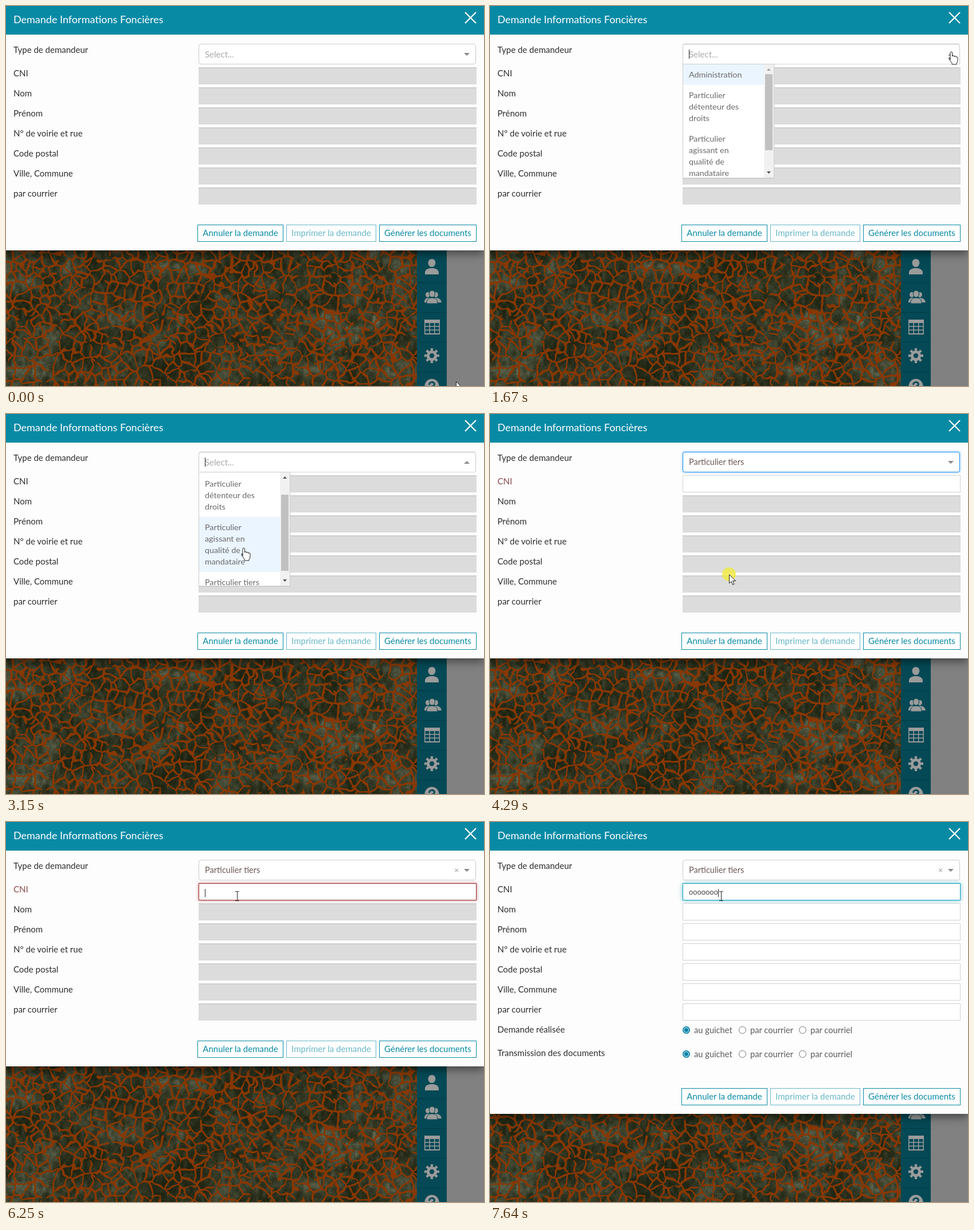
Recreate the animation shown at these times as an HTML page with a canvas. Size 834x664 px, loop 8000 ms.

```html
<!DOCTYPE html>
<html lang="fr">
<head>
<meta charset="utf-8">
<title>Demande Informations Foncières</title>
<style>
  html, body { margin: 0; width: 834px; height: 664px; overflow: hidden; background: #818181; }
  body { position: relative; font: 15px/20px Lato, sans-serif; color: #2e2e2e; }
  body * { box-sizing: border-box; }
  #form > *, #menu, #map, #side, #cursor, #click { position: absolute; }
  #map { left: 0; top: 427px; }
  #side { left: 717px; top: 427px; }
  #form { position: absolute; left: 0; top: 0; width: 834px; height: 427px; background: #fdfdfd; box-shadow: 0 5px 15px rgba(0,0,0,.5); }
  #form.long { height: 510px; }
  header { left: 0; top: 0; width: 834px; height: 50px; padding: 13px; background: #088aa5; color: #fff; font-size: 18px; }
  header svg { position: absolute; left: 800px; top: 10px; }
  .label { left: 13px; }
  .label.bad { color: #8d4a4a; }
  .field { left: 336px; width: 485px; height: 30px; padding-left: 10px; background: #dcdcdc; border: solid #cecece; border-width: 2px 0 0; font-size: 12.8px; line-height: 28px; white-space: nowrap; color: #444; }
  .field.on { background: #fff; border: 1px solid #d2d2d2; }
  .field.bad { border-color: #9c2a2e; box-shadow: 0 0 5px rgba(169,50,50,.65); }
  .field.good { border-color: #12a0bb; box-shadow: 0 0 7px rgba(18,160,187,.65); }
  .caret { display: inline-block; width: 1px; height: 14px; background: #222; vertical-align: middle; }
  #select { left: 336px; top: 66px; width: 484px; height: 36px; padding: 7px 10px; background: #fff; border: 1px solid #ccc; border-radius: 4px; color: #aaa; }
  #select.open { border-color: #b3b3b3 #ccc #d9d9d9; border-radius: 4px 4px 0 0; }
  #select.chosen { color: #705858; font-size: 14.5px; }
  #select.focus { border-color: #0a84f0; box-shadow: 0 0 0 3px rgba(0,126,255,.1); }
  #select .caret { position: absolute; left: 10px; top: 9px; height: 16px; }
  #select svg { position: absolute; left: 462px; top: 15px; }
  #select.open svg { transform: rotate(180deg); }
  #clear { position: absolute; left: 445px; top: 7px; color: #999; font-size: 14px; }
  #menu { left: 336px; top: 101px; width: 160px; height: 200px; background: #fff; border: 1px solid #ccc; overflow: hidden; box-shadow: 0 1px 0 rgba(0,0,0,.06); font-size: 14.3px; color: #6a6a6a; }
  #menu div { width: 141px; padding: 8px 10px; white-space: nowrap; }
  #menu div.hot { background: #ebf5ff; }
  #menu svg { position: absolute; left: 141px; top: 0; }
  .button { top: 382px; height: 30px; border: 1px solid #088aa5; background: #fff; color: #088aa5; line-height: 27px; text-align: center; white-space: nowrap; }
  .long .button { top: 465px; }
  .button.off { opacity: .6; }
  .button.hot { background: #088aa5; color: #fff; }
  .extra { visibility: hidden; }
  .long .extra { visibility: visible; }
  .radio { color: #5b5b5b; font-size: 14.7px; white-space: nowrap; }
  .radio::before { content: ""; position: absolute; left: -20px; top: 4px; width: 13px; height: 13px; box-sizing: border-box; border: 1px solid #767676; border-radius: 50%; background: #fff; }
  .radio.on::before { border: 2px solid #0a84a8; background: radial-gradient(#0a84a8 3.4px, #fff 4px); }
  #click { width: 24px; height: 24px; margin: -12px; border-radius: 50%; background: rgba(240,234,70,.85); }
  #cursor { left: 0; top: 0; overflow: visible; }
</style>
</head>
<body>
<canvas id="map" width="717" height="237"></canvas>

<svg id="side" width="52" height="237" viewBox="717 427 52 237" fill="#9b9b9b">
  <path fill="#044955" d="M717 427h52v237h-52z"/>
  <path stroke="#033c47" d="M717 431.5h52M717 483.5h52M717 535.5h52M717 587.5h52M717 639.5h52"/>
  <path d="M743 442c9 0 8 14 0 14s-9-14 0-14zM731 469v-4c1-5 6-7 12-7s11 2 12 7v4z"/>
  <path d="M736 500c5.500 0 5 9 0 9s-5.500-9 0-9zM750 500c5.500 0 5 9 0 9s-5.500-9 0-9zM730 518c0-6 3-8 7-8h12c6 0 10 2 11 8z"/>
  <path stroke="#044955" d="M743.500 497c7 0 6.500 12 0 12s-7-12 0-12zM734 520v-2c0-6 4-8 9.500-8s9.500 2 9.500 8v2z"/>
  <path d="M730 548h27v26h-27z"/>
  <path fill="none" stroke="#044955" stroke-width="5" stroke-dasharray="7 1.500" d="M731.500 556.500h24M731.500 563h24M731.500 569.500h24"/>
  <g fill="none" stroke="#9b9b9b" stroke-width="5">
    <circle cx="743" cy="611" r="6.700"/>
    <circle cx="743" cy="611" r="10.500" pathLength="16" stroke-dasharray="1" stroke-dashoffset=".5"/>
  </g>
  <circle cx="743" cy="664" r="12.500"/>
  <path d="M738.500 662c0-6 9-6 9-1 0 3-4 3-4 6" fill="none" stroke="#044955" stroke-width="3"/>
</svg>

<div id="form">
  <header>Demande Informations Foncières
    <svg width="21" height="21" stroke="#fff" stroke-width="2.200"><path d="M1 1 20 20M20 1 1 20"/></svg>
  </header>
  <div id="select"><span id="value"></span><i class="caret"></i><span id="clear">×</span>
    <svg width="10" height="5" fill="#8c8c8c"><path d="M0 0h10L5 5z"/></svg>
  </div>
  <div class="button" style="left:334px;width:150px">Annuler la demande</div>
  <div class="button off" style="left:489px;width:157px">Imprimer la demande</div>
  <div class="button" id="make" style="left:651px;width:170px">Générer les documents</div>
</div>

<div id="menu">
  <section id="list">
    <div>Administration</div>
    <div>Particulier<br>détenteur des<br>droits</div>
    <div>Particulier<br>agissant en<br>qualité de<br>mandataire</div>
    <div>Particulier tiers</div>
  </section>
  <svg width="17" height="198">
    <path fill="#f1f1f1" d="M0 0h17v198H0z"/>
    <path id="up" d="M5 11h7L8.500 7z"/>
    <path fill="#505050" d="M5 187h7l-3.500 4z"/>
    <rect id="thumb" x="2" y="17" width="13" height="133" fill="#c1c1c1"/>
  </svg>
</div>

<div id="click"></div>
<svg id="cursor" width="1" height="1">
  <path id="arrow" fill="#fff" stroke="#222" d="M.5.5V16L4 12.500 6.600 18.300 9 17.200 6.400 11.600H11.600Z"/>
  <path id="hand" fill="#fff" stroke="#222" d="M-2 14V2a1.800 1.800 0 0 1 3.600 0v6q0-1.400 1.700-1.400t1.700 1.400v.8q0-1.300 1.600-1.300t1.600 1.500v.8q.3-1 1.500-1t1.300 1.500v5q0 3-2 5v1.700h-8v-2.500q-3-3.500-5.500-8 0-2 2-1.200z"/>
  <g id="deny" fill="#e2dcdc" stroke="#9c2430" stroke-width="2"><circle r="7"/><path d="M-5-5 5 5"/></g>
  <path id="beam" fill="none" stroke="#222" d="M-3-7.500h2.500q.5 0 .5.500.5-.5 1-.5h2.500M.5-7V8M-3 8.500h2.500q.5 0 .5-.5.5.5 1 .5h2.500"/>
</svg>

<script>
const $ = id => document.getElementById(id);
const form = $('form');

function add(cls, x, y, text = '') {
  const el = document.createElement('div');
  el.className = cls;
  if (x !== null) el.style.left = x + 'px';
  el.style.top = y + 'px';
  el.textContent = text;
  form.append(el);
  return el;
}

const names = ['CNI', 'Nom', 'Prénom', 'N° de voirie et rue', 'Code postal', 'Ville, Commune', 'par courrier'];
add('label', null, 66, 'Type de demandeur');
const labels = names.map((name, i) => add('label', null, 107 + 35 * i, name));
const fields = names.map((_, i) => add('field', null, 107 + 35 * i));
[['Demande réalisée', 352], ['Transmission des documents', 394]].forEach(([name, y], row) => {
  add('label extra', null, y - row, name);
  [[356, 'au guichet'], [454, 'par courrier'], [559, 'par courriel']].forEach(([x, text], i) =>
    add('radio extra' + (i ? '' : ' on'), x, y + 1, text));
});
const cni = fields[0];
cni.innerHTML = '<span></span><i class="caret"></i>';
const [typed, cniCaret] = cni.children;

// Aerial view: noisy ground under a warped cell network
function hash(x, y) {
  let h = Math.imul(x, 374761393) + Math.imul(y, 668265263) | 0;
  h = Math.imul(h ^ h >>> 13, 1274126177);
  return ((h ^ h >>> 16) >>> 0) / 4294967296;
}
function noise(x, y) {
  const i = Math.floor(x), j = Math.floor(y);
  const u = (x - i) ** 2 * (3 - 2 * (x - i)), v = (y - j) ** 2 * (3 - 2 * (y - j));
  const a = hash(i, j), b = hash(i, j + 1);
  const top = a + (hash(i + 1, j) - a) * u;
  return top + (b + (hash(i + 1, j + 1) - b) * u - top) * v;
}
function drawMap() {
  const W = 717, H = 237, G = 15, cols = 58, rows = 26;
  const seeds = [];
  for (let j = 0; j < rows; j++) for (let i = 0; i < cols; i++) {
    seeds.push(hash(i + 900, j) < .72 && [(i - 4 + hash(i, j + 300)) * G, (j - 4 + hash(i, j + 600)) * G]);
  }
  // Distance from a point to the nearest cell border
  function border(px, py) {
    const ci = Math.floor(px / G) + 4, cj = Math.floor(py / G) + 4;
    const around = [];
    let near = 1e9, home;
    for (let j = cj - 2; j <= cj + 2; j++) for (let i = ci - 2; i <= ci + 2; i++) {
      const s = seeds[j * cols + i];
      if (!s) continue;
      const d = (s[0] - px) ** 2 + (s[1] - py) ** 2;
      around.push(s, d);
      if (d < near) { near = d; home = s; }
    }
    let best = 99;
    for (let k = 0; k < around.length; k += 2) {
      const s = around[k];
      if (s !== home) best = Math.min(best, (around[k + 1] - near) / 2 / Math.hypot(s[0] - home[0], s[1] - home[1]));
    }
    return best;
  }
  const ctx = $('map').getContext('2d'), img = ctx.createImageData(W, H);
  for (let y = 0; y < H; y++) for (let x = 0; x < W; x++) {
    const px = x + 8 * noise(x / 10, y / 10) - 4, py = y + 8 * noise(x / 10 + 80, y / 10) - 4;
    const open = Math.max(0, noise(x / 13 + 40, y / 13 + 70) - .74) * 14;
    const line = Math.min(1, Math.max(0, 2.25 - open - border(px, py)));
    const v = (.55 * noise(x / 38, y / 30 + 9) + .4 * noise(x / 6, y / 9 + 50) + .3 * hash(x, y)) ** 2;
    const k = (y * W + x) * 4;
    [[24, 62, 136], [30, 62, 55], [12, 58, 2]].forEach(([base, span, ink], c) => {
      const ground = base + span * v;
      img.data[k + c] = ground + (ink - ground) * line;
    });
    img.data[k + 3] = 255;
  }
  ctx.putImageData(img, 0, 0);
}
drawMap();

// Timeline in ms
const path = [[70, 785, 656], [540, 795, 132], [860, 807, 86], [920, 807, 86], [1210, 805, 80], [1930, 805, 80],
  [2680, 415, 230], [3150, 415, 234], [3670, 415, 234], [4150, 417, 280], [4350, 417, 280], [4770, 403, 129]];
const scroll = [[2850, 0], [3150, 34], [3280, 46]];
const keys = [6710, 6850, 6990, 7190, 7310, 7440, 7640];
const clicks = [[1400, 1530], [4290, 4360], [5180, 5330]];
const OPEN = 1470, PICK = 4290, FOCUS = 5180, VALID = 6710;

function at(track, t, axis = 1) {
  const n = track.findIndex(p => p[0] > t);
  if (n < 1) return (n ? track[track.length - 1] : track[0])[axis];
  const a = track[n - 1], b = track[n];
  return a[axis] + (b[axis] - a[axis]) * (t - a[0]) / (b[0] - a[0]);
}
const within = (v, a, b) => v >= a && v < b;
const show = (el, on) => { el.style.display = on ? '' : 'none'; };
const blink = (el, on) => { el.style.visibility = on ? '' : 'hidden'; };

function cursorKind(t, x, y) {
  if (within(t, PICK, 4360) || y > 427) return 'arrow';
  if (within(t, OPEN, PICK) && x < 496 && y > 101) return 'hand';
  if (within(y, 66, 102) || within(y, 382, 412)) return 'hand';
  const row = Math.floor((y - 107) / 35);
  if (!within(row, 0, 7) || (y - 107) % 35 > 30) return 'arrow';
  return t >= PICK && row === 0 ? 'beam' : 'deny';
}

function render(t) {
  const x = at(path, t), y = at(path, t, 2);
  const open = within(t, OPEN, PICK), picked = t >= PICK, valid = t >= VALID;

  $('cursor').style.transform = `translate(${x}px,${y}px)`;
  const kind = cursorKind(t, x, y);
  for (const id of ['arrow', 'hand', 'deny', 'beam']) show($(id), id === kind);
  show($('click'), clicks.some(([a, b]) => within(t, a, b)));
  $('click').style.left = x + 'px';
  $('click').style.top = y + 'px';
  $('make').classList.toggle('hot', within(y, 382, 412));

  const select = $('select');
  select.classList.toggle('open', open);
  select.classList.toggle('chosen', picked);
  select.classList.toggle('focus', within(t, PICK, FOCUS));
  $('value').textContent = picked ? 'Particulier tiers' : 'Select...';
  show($('clear'), t >= 4360);
  blink(select.querySelector('.caret'), open && Math.floor((t - 1580 + 1060) / 530) % 2 === 0);

  show($('menu'), open);
  const shift = at(scroll, t), inside = x < 478 && y > 102;
  $('list').style.transform = `translateY(${-shift}px)`;
  $('thumb').setAttribute('y', 17 + shift * 22 / 34);
  $('up').setAttribute('fill', shift ? '#505050' : '#a3a3a3');
  const spot = y - 102 + shift;
  const hot = inside ? [36, 112, 208].filter(edge => spot >= edge).length : 0;
  [...$('list').children].forEach((el, i) => el.classList.toggle('hot', i === hot));

  form.classList.toggle('long', valid);
  labels[0].classList.toggle('bad', picked && !valid);
  fields.forEach((el, i) => el.classList.toggle('on', valid || picked && !i));
  cni.classList.toggle('bad', t >= FOCUS && !valid);
  cni.classList.toggle('good', valid);
  typed.textContent = 'o'.repeat(keys.filter(k => t >= k).length);
  blink(cniCaret, within(t, FOCUS, 5710) || t >= 6250);
}

const start = performance.now();
function tick() {
  render((performance.now() - start) % 8000);
  requestAnimationFrame(tick);
}
tick();
</script>
</body>
</html>
```
